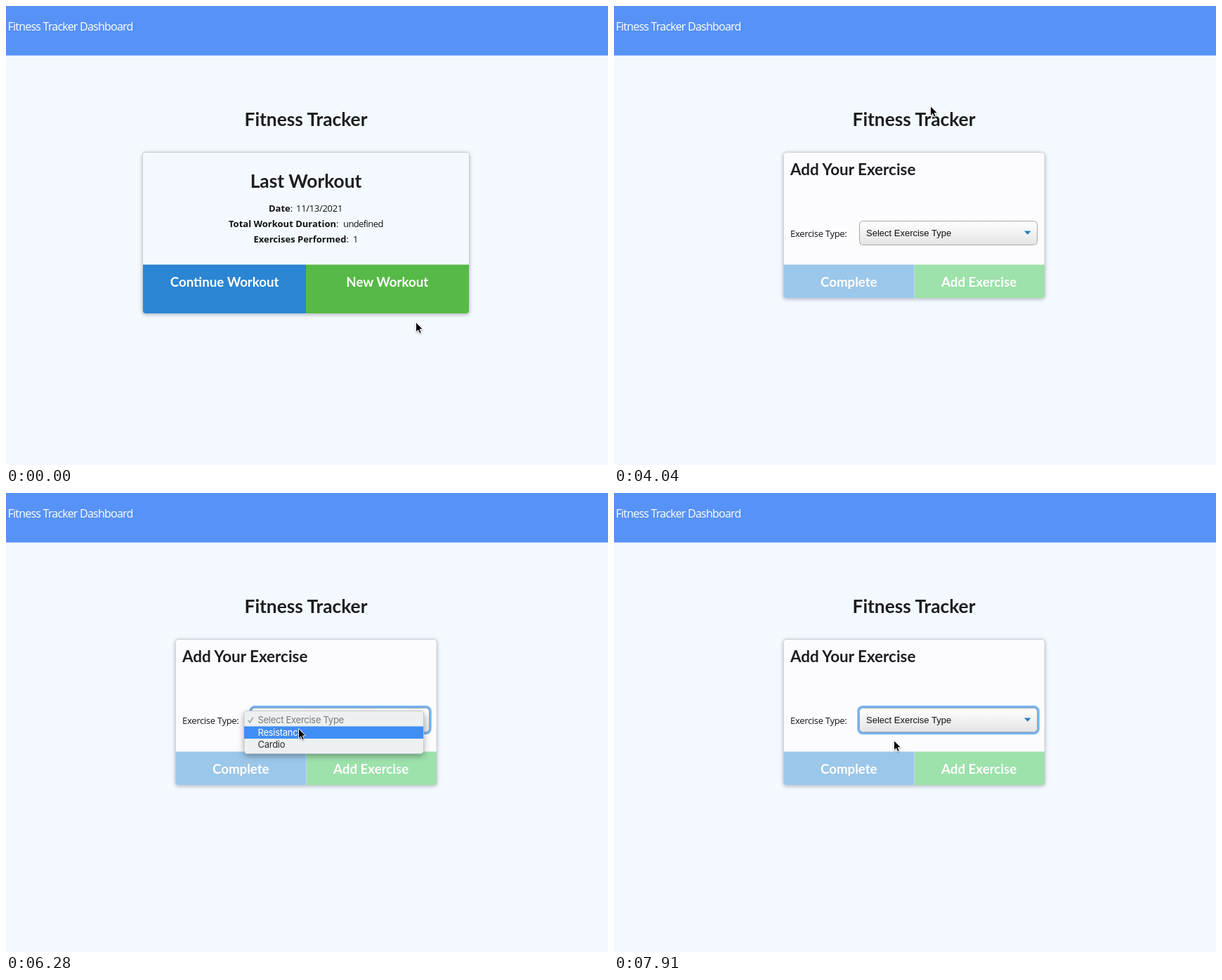
An HTML page for the animation above (8 s loop, 857x654 px).

```html
<!DOCTYPE html>
<html lang="en">
<head>
<meta charset="utf-8">
<title>Fitness Tracker</title>
<style>
  html, body { margin: 0; width: 100%; height: 100%; overflow: hidden; background: #f4f9ff; }
  svg { display: block; width: 100vw; height: 100vh; }
  text { white-space: pre; font-variant-ligatures: none; }
  .nav { font: 500 16px "Open Sans", sans-serif; letter-spacing: -.76px; fill: #fff; }
  .head { font: 700 26.3px Lato, sans-serif; fill: #1d1e20; text-anchor: middle; }
  .sub { font: 700 22.4px Lato, sans-serif; fill: #1d1e20; }
  .btn { font: 700 18.7px Lato, sans-serif; fill: #fff; text-anchor: middle; }
  .body { font: 500 13px "Open Sans", sans-serif; letter-spacing: -.3px; fill: #111214; }
  .tight { letter-spacing: -.6px; }
  .bold { font-weight: 700; letter-spacing: 0; }
  .field { font: 13px "Liberation Sans", Arial, sans-serif; fill: #111; }
  .item { font: 13px Inter, sans-serif; letter-spacing: -.28px; fill: #2b2c2d; }
  .hint { fill: #777a7c; }
  .card { stroke: #cdd1d6; filter: drop-shadow(0 1px 2.5px rgba(30, 45, 60, .32)); }
  .menu { filter: drop-shadow(0 3px 4px rgba(0, 0, 0, .32)); }
  .cursor { filter: drop-shadow(0 1px 1px rgba(0, 0, 0, .35)); }
</style>
</head>
<body>
<svg viewBox="0 0 857 654" preserveAspectRatio="none">
  <defs>
    <linearGradient id="shade" x2="0" y2="1">
      <stop offset="0" stop-color="#fff"/>
      <stop offset="1" stop-color="#e4e4e5"/>
    </linearGradient>
    <clipPath id="wide"><rect x="195" y="209" width="464" height="229" rx="4"/></clipPath>
    <clipPath id="narrow"><rect x="241.5" y="209" width="371.5" height="207" rx="4"/></clipPath>
  </defs>

  <rect width="857" height="654" fill="#f4f9ff"/>
  <rect width="857" height="70.5" fill="#5792f7"/>
  <text class="nav" x="2.5" y="35">Fitness Tracker Dashboard</text>
  <text class="head" x="427" y="171">Fitness Tracker</text>

  <g id="summary">
    <rect class="card" x="194.5" y="208.5" width="465" height="230" rx="4.5" fill="#f4f9ff"/>
    <text class="head" x="427" y="259">Last Workout</text>
    <text class="body" y="292.5"><tspan class="bold" x="374">Date</tspan>:<tspan x="413">11/13/2021</tspan></text>
    <text class="body" y="315"><tspan class="bold" x="317">Total Workout Duration</tspan>:<tspan class="tight" x="480">undefined</tspan></text>
    <text class="body" y="337"><tspan class="bold" x="352.5">Exercises Performed</tspan>:<tspan x="494">1</tspan></text>
    <g clip-path="url(#wide)">
      <rect x="195" y="368.5" width="232" height="70" fill="#2b85d2"/>
      <rect id="newBtn" x="427" y="368.5" width="232" height="70"/>
    </g>
    <text class="btn" x="311.2" y="400">Continue Workout</text>
    <text class="btn" x="542.8" y="400">New Workout</text>
  </g>

  <g id="form">
    <rect class="card" x="241.2" y="208.5" width="372" height="208" rx="4.5" fill="#fcfcff"/>
    <text class="sub" x="251" y="241">Add Your Exercise</text>
    <text class="body" x="251" y="329">Exercise Type:</text>
    <rect id="ring" x="348" y="304.8" width="256" height="37.4" rx="6" fill="none" stroke="#74b2f4" stroke-width="3.4"/>
    <rect x="349.5" y="306.5" width="253" height="34" rx="5" fill="url(#shade)" stroke="#a6a7a9"/>
    <text class="field" x="359" y="328">Select Exercise Type</text>
    <path d="M584 320.5h9.6l-4.8 5.2z" fill="#2380b8"/>
    <g clip-path="url(#narrow)">
      <rect x="241" y="368.5" width="186.5" height="48" fill="#9bc7ea"/>
      <rect x="427.5" y="368.5" width="186" height="48" fill="#9de1ab"/>
    </g>
    <text class="btn" x="334.3" y="400">Complete</text>
    <text class="btn" x="519.7" y="400">Add Exercise</text>
  </g>

  <g id="menu">
    <rect class="menu" x="339" y="310.5" width="255.5" height="61" rx="4.5" fill="#edf0f0" stroke="#b9bdc1" stroke-width=".7"/>
    <rect id="bar" x="339" width="255" height="17.5" fill="#3f8ef6"/>
    <path d="M344.8 324l2.5 3 4.4-7.4" fill="none" stroke="#9a9c9e" stroke-width="1.5"/>
    <text class="item hint" x="358.5" y="328">Select Exercise Type</text>
    <text class="item" id="row1" x="358.5" y="345.5">Resistance</text>
    <text class="item" id="row2" x="358.5" y="363">Cardio</text>
  </g>

  <path id="arrow" class="cursor" d="M0 0V14.2L3.2 11.2L5.3 16L7.8 14.9L5.7 10.2H10Z" fill="#000" stroke="#fff"/>
  <g id="hand" class="cursor" fill="#fff" stroke="#000" stroke-width="1.1" stroke-linejoin="round" stroke-linecap="round">
    <path d="M4.2 9L2.6 2.6C2.2 .5 4.3 .2 4.9 1.9L6 5.3C6.4 4.2 8 4.2 8.4 5.4C9 4.5 10.4 4.7 10.8 5.9C11.6 5.2 13 5.7 13.2 7C13.6 9.4 13.2 11 12 13V15.6H5.6V14C4.3 12.3 2.4 11 1.2 9C.5 7.6 2 6.9 3 7.8Z"/>
    <path d="M7.2 10v3M9 10v3M10.8 10v3" stroke-width=".8"/>
  </g>
</svg>

<script>
  const LOOP = 8000, STEP = 149;   // the screen refreshes once per STEP ms
  const FORM_AT = 3000;

  // Events and pointer moves are counted in steps.
  const HOVER = 1, LEAVE = 24, OPEN = 39, PICK = 48, FADE = 52, CLOSE = 53;
  const ROW_TOP = 315, ROW_HEIGHT = 17.5;

  const home = { x: 583, y: 450 };
  const moves = [
    { from: 0, to: 4, x: 575, y: 411 },
    { from: 22, to: 27, x: 450, y: 142 },
    { from: 32, to: 35, x: 441, y: 344 },
    { from: 35, to: 39, x: 421, y: 324 },
    { from: 40, to: 45, x: 407, y: 356 },
    { from: 45, to: 48, x: 401, y: 343 },
    { from: 48, to: 53, x: 398, y: 352 }
  ];

  const el = id => document.getElementById(id);
  const show = (id, on) => { el(id).style.display = on ? "" : "none"; };
  const place = (id, x, y) => el(id).setAttribute("transform", `translate(${x} ${y})`);
  const clamp = v => Math.min(1, Math.max(0, v));
  const smooth = v => v * v * (3 - 2 * v);

  function pointerAt(step) {
    let { x, y } = home;
    for (const m of moves) {
      const k = smooth(clamp((step - m.from) / (m.to - m.from)));
      x += (m.x - x) * k;
      y += (m.y - y) * k;
    }
    return { x, y };
  }

  function drawMenu(step, y) {
    show("ring", step >= OPEN);
    show("menu", step >= OPEN && step < CLOSE);
    el("menu").style.opacity = step >= FADE ? .5 : 1;

    const row = step >= PICK ? 1 : Math.floor((y - ROW_TOP) / ROW_HEIGHT);
    show("bar", row > 0);
    el("bar").setAttribute("y", ROW_TOP + row * ROW_HEIGHT);
    for (const n of [1, 2]) el("row" + n).style.fill = n === row ? "#fff" : "";
  }

  function draw(t) {
    const step = Math.floor(t / STEP);
    const { x, y } = pointerAt(step);

    show("summary", t < FORM_AT);
    show("form", t >= FORM_AT);
    el("newBtn").setAttribute("fill", step >= HOVER ? "#4fab3a" : "#57b948");
    drawMenu(step, y);

    const pointing = step >= HOVER && step < LEAVE;
    show("hand", pointing);
    show("arrow", !pointing);
    place("hand", x - 7, y - 8);
    place("arrow", x + .5, y + .5);
  }

  const start = performance.now();
  function tick() {
    draw((performance.now() - start) % LOOP);
    requestAnimationFrame(tick);
  }
  tick();
</script>
</body>
</html>
```
